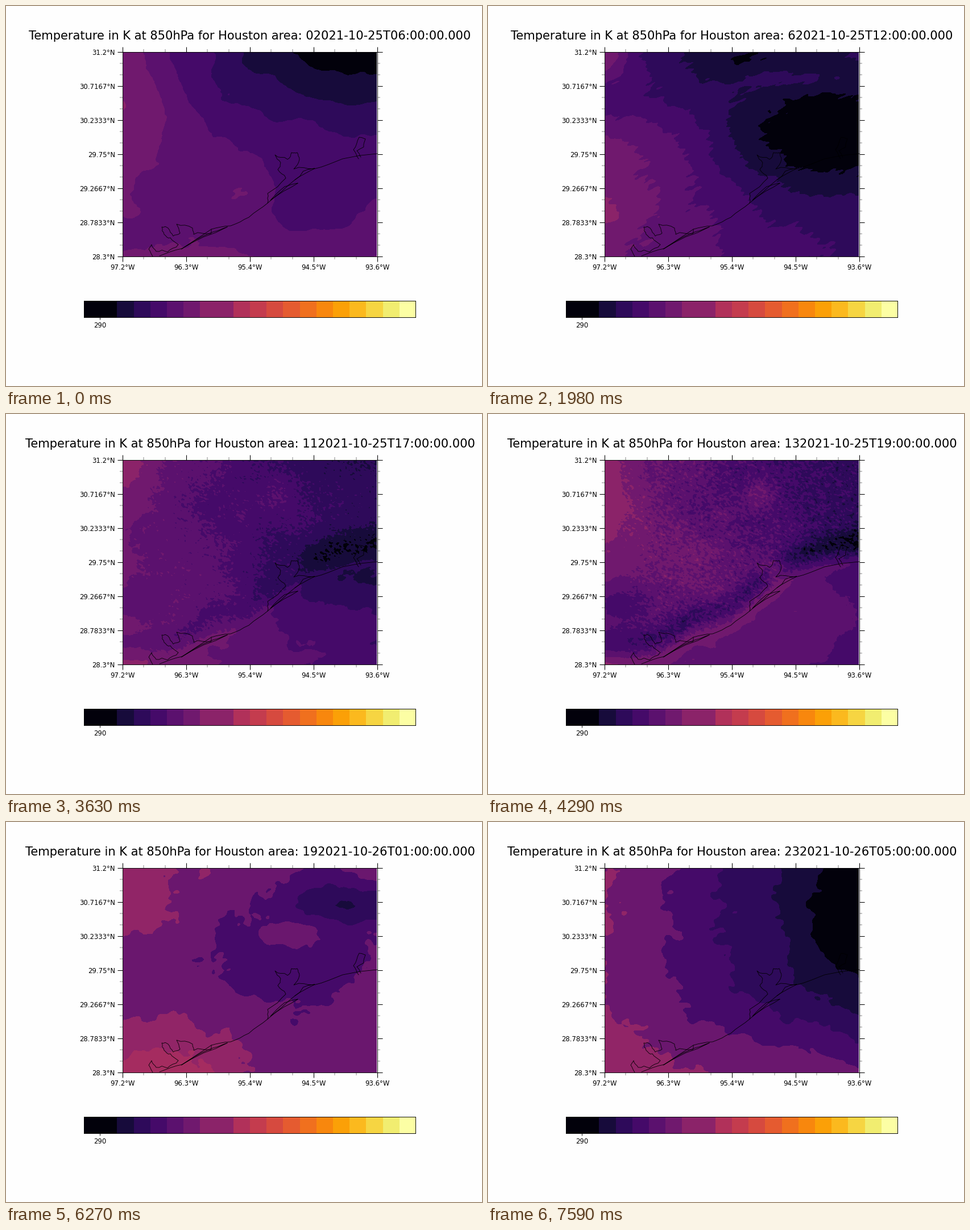
Write a matplotlib script that moves like this. It is 837 by 669 pixels and loops after 7920 ms.

```python
import numpy as np
import matplotlib.pyplot as plt
from matplotlib.animation import FuncAnimation
from matplotlib.colors import to_rgb
from matplotlib.ticker import AutoMinorLocator

W, H, DPI = 837, 669, 64
FRAMES, STEP = 24, 330
SCALE = 83.7 / DPI
LEFT, RIGHT, TOP, BOTTOM = 205, 653, 81, 441

plt.rcParams["font.family"] = "DejaVu Sans"

px, py = np.meshgrid(np.arange(206, 652.), np.arange(81, 441.))
u = (px - LEFT) / (RIGHT - LEFT)
v = (py - TOP) / (BOTTOM - TOP)


def bump(x, y, rx, ry, height):
    """Warm or cold pool in unit map coordinates."""
    return height * np.exp(-((u - x) / rx) ** 2 - ((v - y) / ry) ** 2)


# Weather at the key hours: a slope across the map plus a few air pools
WEATHER = {
    0: 4.7 + bump(.95, -.1, .68, .5, -4.5) + bump(0, .2, .2, .45, 1.6)
       + bump(.75, .72, .25, .18, -1.1) + bump(.49, .69, .12, .13, .8)
       + bump(.5, 1.05, 1, .1, .6),
    3: 4.4 + bump(1, .28, .5, .45, -5) + bump(.12, .28, .4, .28, 2.3)
       + bump(.33, .6, .3, .2, -2.2) + bump(.4, 1.05, .9, .25, 1.9)
       + bump(.3, -.05, .4, .12, -1.5),
    6: 5 - 2.2 * u + bump(.8, .4, .42, .29, -3.2) + bump(.42, 0, .42, .18, -2.6)
       + bump(.7, .13, .2, .06, 1.1) + bump(.15, .5, .25, .25, .7)
       + bump(.08, .25, .25, .13, -1.4) + bump(0, 0, .1, .12, 1.5)
       + bump(0, .8, .15, .15, 1),
    9: 4.3 - 2 * u + 1.6 * v + bump(.78, .53, .37, .2, -3.4)
       + bump(.85, .02, .35, .12, -.9) + bump(.1, .28, .3, .2, -1.1)
       + bump(0, 0, .2, .2, 2.4) + bump(.03, .9, .15, .2, .8)
       + bump(.9, .85, .4, .3, -1),
    13: 5.4 - 3.1 * u + bump(.8, .78, .4, .3, 1.9) + bump(0, .2, .15, .3, 1.2)
        + bump(.33, .47, .2, .15, .7) + bump(.05, .72, .2, .13, -1.6)
        + bump(.61, .17, .06, .08, 1.3) + bump(.46, .27, .03, .03, 1)
        + bump(.66, .53, .05, .06, 2),
    19: 4.6 + bump(.95, .18, .3, .1, -2.4) + bump(.65, .45, .35, .25, -1.25)
        + bump(.65, .33, .12, .08, .9) + bump(0, .1, .22, .25, 1)
        + bump(.1, 1, .35, .22, 1.9) + bump(.78, .05, .15, .1, -.8),
    23: 5 - 4.2 * u + bump(.92, .22, .2, .25, -.9)
        + bump(.95, 1.05, .6, .33, 3.3) + bump(.05, .95, .25, .2, .4),
}
hours = list(WEATHER)

COAST = [(270, 440), (310, 427), (361, 393), (395, 387), (427, 372), (460, 347),
         (508, 306), (541, 287), (592, 269), (653, 260)]
BAY = [(508, 306), (543, 286), (506, 287), (516, 270), (512, 258), (502, 258),
       (495, 270), (473, 262), (483, 276), (478, 288), (492, 303), (460, 330),
       (460, 347)]
LAKE = [(620, 269), (611, 253), (621, 231), (632, 234), (629, 248), (617, 255),
        (624, 266)]
LAGOON = [(361, 393), (360, 401), (330, 402), (328, 391), (300, 384), (306, 400),
          (294, 405), (285, 391), (274, 389), (278, 402), (289, 408), (303, 420),
          (284, 433), (264, 432), (256, 420), (251, 428), (258, 441)]
ISLAND = [(513, 312), (465, 342), (490, 318), (513, 312)]
SPIT = [(389, 389), (308, 428), (356, 401), (389, 389)]


def roughen(points, amount, rng):
    """Two rounds of random midpoint displacement."""
    pts = np.array(points, float)
    for _ in range(2):
        step = np.diff(pts, axis=0)
        shift = rng.uniform(-amount, amount, (len(step), 1))
        mids = pts[:-1] + step / 2 + step[:, ::-1] * (1, -1) * shift
        pts = np.insert(pts, np.arange(1, len(pts)), mids, axis=0)
    return pts


def noise(seed, along, across, tilt=0):
    """Smooth random field with blobs of the given size."""
    rng = np.random.default_rng(seed)
    fy = np.fft.fftfreq(px.shape[0])[:, None]
    fx = np.fft.fftfreq(px.shape[1])
    a = (fx * np.cos(tilt) + fy * np.sin(tilt)) * along
    b = (fy * np.cos(tilt) - fx * np.sin(tilt)) * across
    mask = np.exp(-2 * np.pi ** 2 * (a ** 2 + b ** 2))
    out = np.fft.ifft2(np.fft.fft2(rng.normal(size=px.shape)) * mask).real
    return out / out.std()


streaks = noise(3, 7, 1.8, -.4)
rough = noise(5, 5, 4)
swell = noise(6, 18, 14)
speckle = noise(8, 1.6, 1.1, .5)

# Daytime heating: a cool front inland, a warm strip on the beach
inland = np.interp(px, *zip(*COAST)) - py
land = np.clip(inland / 20, .06, 1) * np.clip((u - .02) * 5, .1, 1)
breeze = .8 * np.exp(-(inland / 14) ** 2) - 1.7 * np.exp(-((inland - 38) / 24) ** 2)


def temperature(i):
    k = min(np.searchsorted(hours, i, side="right") - 1, len(hours) - 2)
    t = (i - hours[k]) / (hours[k + 1] - hours[k])
    base = (1 - t) * WEATHER[hours[k]] + t * WEATHER[hours[k + 1]]
    wind = np.interp(i, [0, 3, 9, 12], [.01, .07, .07, .01])
    jag = np.interp(i, [0, 13, 19], [.02, .06, .07])
    heat = np.interp(i, [9, 13, 18], [0, 1, 0])
    return (base + .1 * swell + wind * np.roll(streaks, 9 * i, 1)
            + jag * np.roll(rough, 5 * i, 1)
            + heat * (breeze + .4 * land * np.roll(speckle, 7 * i, 0)))


bar = plt.cm.inferno(np.linspace(0, 1, 20))[:, :3]
bar[:2] = to_rgb("#02010b")
bar[7:9] = to_rgb("#8b2369")
day = bar[1:8]
night = bar[[1, 2, 3, 4, 6, 8, 9]]
night[4:] = [to_rgb(c) for c in ("#6a176e", "#912567", "#a52c60")]

fig = plt.figure(figsize=(W / DPI, H / DPI), dpi=DPI, facecolor="#fefefe")


def stage_axes(x0, x1, y0, y1):
    ax = fig.add_axes([x0 / W, 1 - y1 / H, (x1 - x0) / W, (y1 - y0) / H],
                      facecolor="#fefefe")
    for spine in ax.spines.values():
        spine.set_linewidth(.8 * SCALE)
    return ax


ax = stage_axes(LEFT, RIGHT, TOP, BOTTOM)
image = ax.imshow(np.zeros(px.shape + (3,)), extent=(206, 652, BOTTOM, TOP),
                  aspect="auto", interpolation="nearest")
rng = np.random.default_rng(4)
for line, amount in ((COAST, .03), (BAY, .16), (LAKE, .08), (LAGOON, .18),
                     (ISLAND, .03), (SPIT, .03)):
    ax.plot(*roughen(line, amount, rng).T, color="black", lw=.7 * SCALE)
ax.set(xlim=(LEFT, RIGHT), ylim=(BOTTOM, TOP))
ax.set_xticks(np.linspace(LEFT, RIGHT, 5),
              [f"{d:.1f}°W" for d in np.linspace(97.2, 93.6, 5)])
ax.set_yticks(np.linspace(BOTTOM, TOP, 7),
              [f"{d:.6g}°N" for d in np.linspace(28.3, 31.2, 7)])
ax.xaxis.set_minor_locator(AutoMinorLocator(3))
ax.yaxis.set_minor_locator(AutoMinorLocator(3))
ax.tick_params(which="both", top=True, right=True)
ax.tick_params(which="major", length=8 * SCALE, width=.9 * SCALE,
               labelsize=10 * SCALE, pad=3.5 * SCALE)
ax.tick_params(which="minor", length=4 * SCALE, width=.4 * SCALE)

cax = stage_axes(137, 720.4, 519, 548)
cax.imshow(bar[None], extent=(0, 20, 0, 1), aspect="auto", interpolation="nearest")
cax.set_yticks([])
cax.set_xticks([.97], ["290"])
cax.tick_params(length=3.5 * SCALE, width=.8 * SCALE, labelsize=10 * SCALE,
                pad=3.5 * SCALE)

title = fig.text((LEFT + RIGHT) / 2 / W, 1 - 59 / H, "", ha="center",
                 va="baseline", fontsize=18.08 * SCALE)


def draw(i):
    colors = day if i < 16 else night
    image.set_data(colors[np.clip(np.floor(temperature(i)), 0, 6).astype(int)])
    days, hour = divmod(6 + i, 24)
    title.set_text("Temperature in K at 850hPa for Houston area: "
                   f"{i}2021-10-{25 + days}T{hour:02d}:00:00.000")
    return image, title


anim = FuncAnimation(fig, draw, frames=FRAMES, interval=STEP, repeat=True)
plt.show()
```
